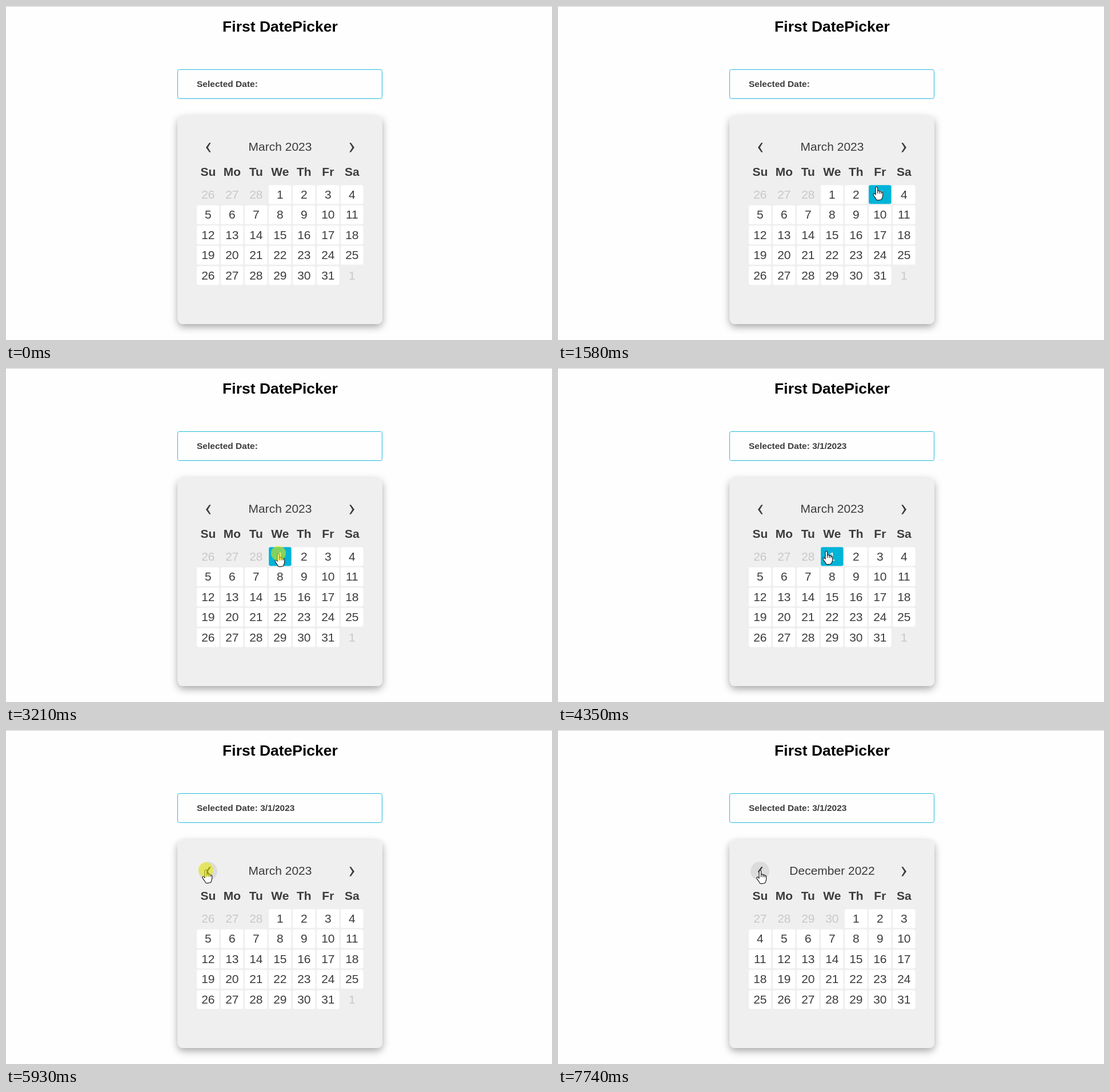
Recreate the animation shown at these times as an HTML page. Size 956 px wide and 586 px high, loop 8 s.

```html
<!DOCTYPE html>
<html lang="en">
<head>
<meta charset="utf-8">
<title>First DatePicker</title>
<style>
  html, body { margin: 0; width: 100%; height: 100%; overflow: hidden; background: #fefefe; }
  svg { display: block; width: 956px; height: 586px; }
  text { font: 21px "Liberation Sans", Arial, sans-serif; fill: #3c3c3c; text-anchor: middle; }
  .bold { font-weight: bold; }
  .title { font-size: 26.5px; fill: #000; }
  .selected { font-size: 15.5px; text-anchor: start; }
  .chevron { fill: #3c3c3c; }
  .cell rect { fill: #fff; }
  .cell.outside rect { fill: none; }
  .cell.outside text { fill: #c8c8c8; }
  .cell.hover rect { fill: #00b4d8; }
  .cell.hover text { fill: #fff; }
  .cursor path { fill: #fff; stroke: #111; stroke-width: 1.1; stroke-linejoin: round; }
  .cursor .fingers { fill: none; }
</style>
</head>
<body>
<svg viewBox="0 0 956 586">
  <defs>
    <filter id="shadow" x="-10%" y="-10%" width="120%" height="120%">
      <feDropShadow dx="0" dy="5" stdDeviation="7" flood-color="#000" flood-opacity=".35"/>
    </filter>
    <path id="chevron" d="M356 240 H358.7 L353.6 248.2 L358.7 256.5 H356 L350 248.2 Z"/>
  </defs>
  <rect width="956" height="1" fill="#d0d0d0"/>
  <text class="bold title" x="480" y="44.7">First DatePicker</text>
  <rect x="300.5" y="111.5" width="358" height="51" rx="3" fill="#fefefe" stroke="#22bbdc"/>
  <text class="bold selected" id="selected" x="334" y="142"></text>
  <rect x="300.8" y="193" width="358" height="365" rx="9" fill="#efefef" filter="url(#shadow)"/>
  <circle id="buttonHover" cx="353.6" cy="247.5" r="16.5" fill="#dcdcdc"/>
  <use class="chevron" href="#chevron"/>
  <use class="chevron" href="#chevron" transform="matrix(-1 0 0 1 960 0)"/>
  <text id="month" x="480" y="254.3"></text>
  <g id="grid"></g>
  <g id="cursor" class="cursor">
    <path id="arrow" d="M.5 .5 V17.4 L4.4 13.8 L7 20 L9.6 18.9 L7 12.8 H12.6 Z"/>
    <g id="hand">
      <path d="M-1.9 2.2 C-1.9 -.1 1.7 -.1 1.7 2.2 V8 C2.2 6.4 5 6.6 5.1 8.7 C5.8 7.4 8 7.8 8.1 9.7
               C9 8.9 10.7 9.5 10.7 11.2 V15.6 C10.7 18.6 9.2 19.6 8.8 22.2 Q4 24.4 -.4 23.2
               C-1 20.4 -4 18.6 -5.8 14.6 C-6.9 12.2 -4.2 11 -3 12.8 L-1.9 14.2 Z"/>
      <path class="fingers" d="M1.7 8 V12 M5.1 8.7 V12.2 M8.1 9.7 V12.6"/>
    </g>
  </g>
  <circle id="click" r="13" fill="#ebeb00" opacity=".55"/>
</svg>
<script>
const LOOP = 8000;
const COLUMN = 42, ROW = 35.55, LEFT = 334.2, TOP = 314.2, CELL_W = 39.3, CELL_H = 33;
const BUTTON = { x: 353.6, y: 247.5, r: 16.5 };
const MONTHS = ["December 2022", "January 2023", "February 2023", "March 2023"];
const CLICKS = [[3210, 3410], [5930, 6060], [6860, 6930], [7670, 7740]];

// Each move advances in even steps; points are [step, x, y].
const MOVES = [
  { start: 660, end: 1440, points: [[0, 893, 572], [4, 738, 446], [8, 631, 353], [11, 586, 326]] },
  { start: 1510, end: 2280, points: [[0, 573, 321], [3, 528, 309], [6, 494, 317.5], [11, 477, 325]] },
  { start: 4350, end: 5050, points: [[0, 470, 321], [4, 393, 272], [7, 352, 250], [10, 329, 247]] },
  { start: 5250, end: 5600, points: [[0, 331, 247], [5, 350, 245]] },
  { start: 6260, end: 6330, points: [[0, 352, 246], [1, 354, 246]] }
];

const byId = id => document.getElementById(id);
const show = (id, visible) => byId(id).setAttribute("visibility", visible ? "inherit" : "hidden");

function svg(name, attributes, parent) {
  const node = document.createElementNS("http://www.w3.org/2000/svg", name);
  for (const key in attributes) node.setAttribute(key, attributes[key]);
  return parent.appendChild(node);
}

const centerX = column => LEFT + COLUMN * column + CELL_W / 2;
["Su", "Mo", "Tu", "We", "Th", "Fr", "Sa"].forEach((day, column) => {
  svg("text", { class: "bold", x: centerX(column), y: 297.6 }, byId("grid")).textContent = day;
});

const cells = Array.from({ length: 35 }, (_, i) => {
  const column = i % 7, x = LEFT + COLUMN * column, y = TOP + ROW * Math.floor(i / 7);
  const group = svg("g", {}, byId("grid"));
  svg("rect", { x, y, width: CELL_W, height: CELL_H, rx: 3 }, group);
  const label = svg("text", { x: centerX(column), y: y + 23.3 }, group);
  return { x, y, group, label };
});

function cursorAt(time) {
  const move = MOVES.filter(m => m.start <= time).pop();
  if (!move) return null;
  const { start, end, points } = move;
  const last = points[points.length - 1];
  const progress = Math.min(1, (time - start) / (end - start));
  const step = Math.floor(progress * last[0] + 0.01);
  const next = points.find(p => p[0] >= step);
  const previous = points[Math.max(0, points.indexOf(next) - 1)];
  const mix = next === previous ? 0 : (step - previous[0]) / (next[0] - previous[0]);
  return {
    x: previous[1] + (next[1] - previous[1]) * mix,
    y: previous[2] + (next[2] - previous[2]) * mix
  };
}

function drawMonth(index, pointer) {
  byId("month").textContent = MONTHS[index];
  const month = index - 1;
  const offset = new Date(2023, month, 1).getDay();
  let anyHover = false;
  cells.forEach(({ x, y, group, label }, i) => {
    const date = new Date(2023, month, 1 - offset + i);
    const inside = date.getMonth() === (month + 12) % 12;
    const hover = inside && pointer && pointer.x >= x && pointer.x <= x + CELL_W
      && pointer.y >= y && pointer.y <= y + CELL_H;
    anyHover = anyHover || hover;
    label.textContent = date.getDate();
    group.setAttribute("class", "cell" + (inside ? "" : " outside") + (hover ? " hover" : ""));
  });
  return anyHover;
}

function render(time) {
  const pointer = cursorAt(time);
  const done = CLICKS.filter(([, end]) => time >= end).length;
  const pressed = CLICKS.some(([start, end]) => time >= start && time < end);
  const onCell = drawMonth(3 - Math.max(0, done - 1), pointer);
  const onButton = pointer && Math.hypot(pointer.x - BUTTON.x, pointer.y - BUTTON.y) <= BUTTON.r;

  byId("selected").textContent = "Selected Date:" + (done ? " 3/1/2023" : "");
  show("buttonHover", onButton);
  show("cursor", pointer);
  show("click", pressed);
  show("hand", onCell || onButton);
  show("arrow", !(onCell || onButton));
  if (pointer) {
    const place = `translate(${pointer.x} ${pointer.y})`;
    byId("cursor").setAttribute("transform", place);
    byId("click").setAttribute("transform", place);
  }
}

function frame() {
  render(performance.now() % LOOP);
  requestAnimationFrame(frame);
}
frame();
</script>
</body>
</html>
```
